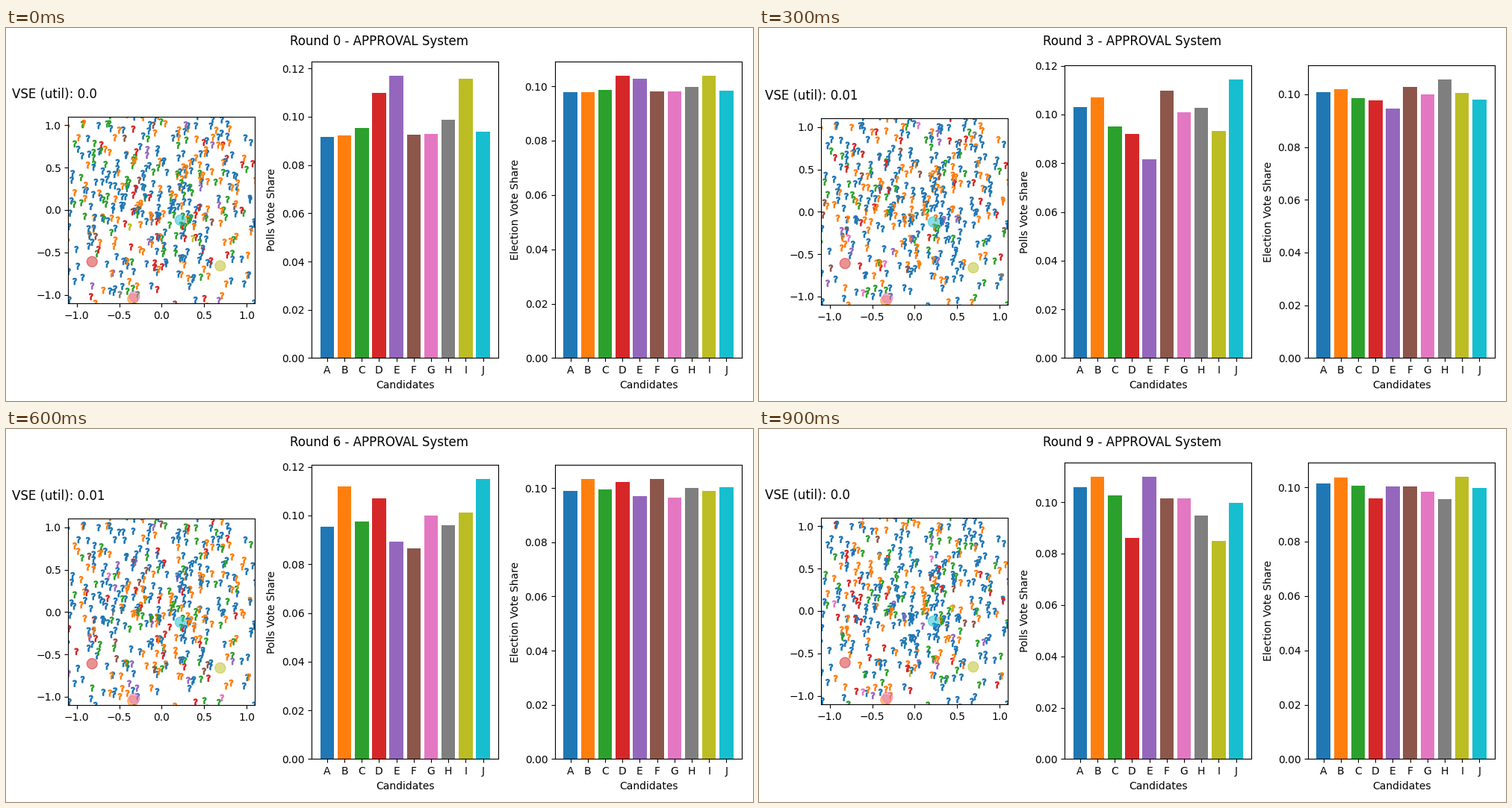
These frames come from a looping animation (1000 by 500 pixels, 1000 ms). A matplotlib script:

```python
import numpy as np
import matplotlib.pyplot as plt
from matplotlib.animation import FuncAnimation

W, H, DPI = 1000, 500, 100
ROUNDS, N_VOTERS, LIM = 10, 700, 1.1
LEFT, STEP, SIDE, BOTTOM = 83.41, 325.81, 249.97, 57.6  # panel grid, px
MAX_H, LABEL_ROOM = 397.0, 391.7  # panel height limits, px
PALETTE = plt.get_cmap("tab10").colors
NAMES = "ABCDEFGHIJ"

# Leading candidate and its share in every round
POLLS = ("EBAJGIJDHE",
         [.1169, .115, .1159, .1144, .118, .125, .115, .1175, .116, .1098])
VOTES = ("DEAHCFFIBI",
         [.1038, .104, .1057, .1056, .104, .1028, .1033, .1066, .104, .1038])
VSE = {2: -0.01, 3: 0.01, 6: 0.01}

# Candidates inside the map: x, y, palette index
CANDIDATES = [(-0.34, -1.05, 1), (-0.82, -0.61, 3), (-0.32, -1.02, 6),
              (0.69, -0.66, 8), (0.22, -0.12, 9)]

voters = np.random.default_rng(12).normal((0, 0.15), (0.9, 0.85), (N_VOTERS, 2))


def shares(leaders, i, spread):
    """The leader takes its share, the others scatter around an even split."""
    names, peaks = leaders
    peak = peaks[i]
    noise = np.random.default_rng(40 + i).normal(0, spread, len(NAMES) - 1)
    rest = (1 - peak) / len(noise) + noise - noise.mean()
    return np.insert(np.minimum(rest, peak), NAMES.index(names[i]), peak)


def ballot_colors(i):
    """Each voter shows the first approved candidate, every one a coin flip."""
    first = np.random.default_rng(100 + i).geometric(0.5, N_VOTERS) - 1
    return [PALETTE[k] for k in np.minimum(first, 9)]


def box(column, bottom, height):
    return [(LEFT + STEP * column) / W, bottom / H, SIDE / W, height / H]


def bar_panel(column, ylabel):
    ax = fig.add_axes(box(column, BOTTOM, MAX_H))
    bars = ax.bar(list(NAMES), np.ones(len(NAMES)), color=PALETTE)
    ax.set_xlabel("Candidates")
    ax.set_ylabel(ylabel)
    ax.yaxis.set_major_formatter("{x:.2f}")
    return ax, bars


fig = plt.figure(figsize=(W / DPI, H / DPI), dpi=DPI, facecolor="white")
title = fig.suptitle("", y=0.982)

space = fig.add_axes(box(0, 131, SIDE))
space.set(xlim=(-LIM, LIM), ylim=(-LIM, LIM))
ticks = np.arange(-1, 1.1, 0.5)
space.set_xticks(ticks)
space.set_yticks(ticks)
crowd = space.scatter(*voters.T, marker="$?$")
cx, cy, ck = zip(*CANDIDATES)
space.scatter(cx, cy, s=100, c=[PALETTE[k] for k in ck], alpha=0.5)
score = space.text(-1.6 * LIM, 1.2 * LIM, "", fontsize=12)

panels = [bar_panel(1, "Polls Vote Share"),
          bar_panel(2, "Election Vote Share")]


def update(i):
    title.set_text(f"Round {i} - APPROVAL System")
    score.set_text(f"VSE (util): {VSE.get(i, 0.0)}")
    crowd.set_color(ballot_colors(i))

    height = MAX_H
    data = shares(POLLS, i, 0.0095), shares(VOTES, i, 0.0027)
    for (ax, bars), values in zip(panels, data):
        for bar, v in zip(bars, values):
            bar.set_height(v)
        top = 1.05 * values.max()
        marks = np.arange(0, top, 0.02)
        ax.set_yticks(marks)
        ax.set_ylim(0, top)
        # keep the highest tick label below the title
        height = min(height, LABEL_ROOM * top / marks[-1])

    for column, (ax, _) in enumerate(panels, 1):
        ax.set_position(box(column, BOTTOM, height))
    space.set_position(box(0, BOTTOM + (height - SIDE) / 2, SIDE))
    return []


anim = FuncAnimation(fig, update, frames=ROUNDS, interval=100,
                     repeat=True, repeat_delay=0, blit=False)
plt.show()
```
